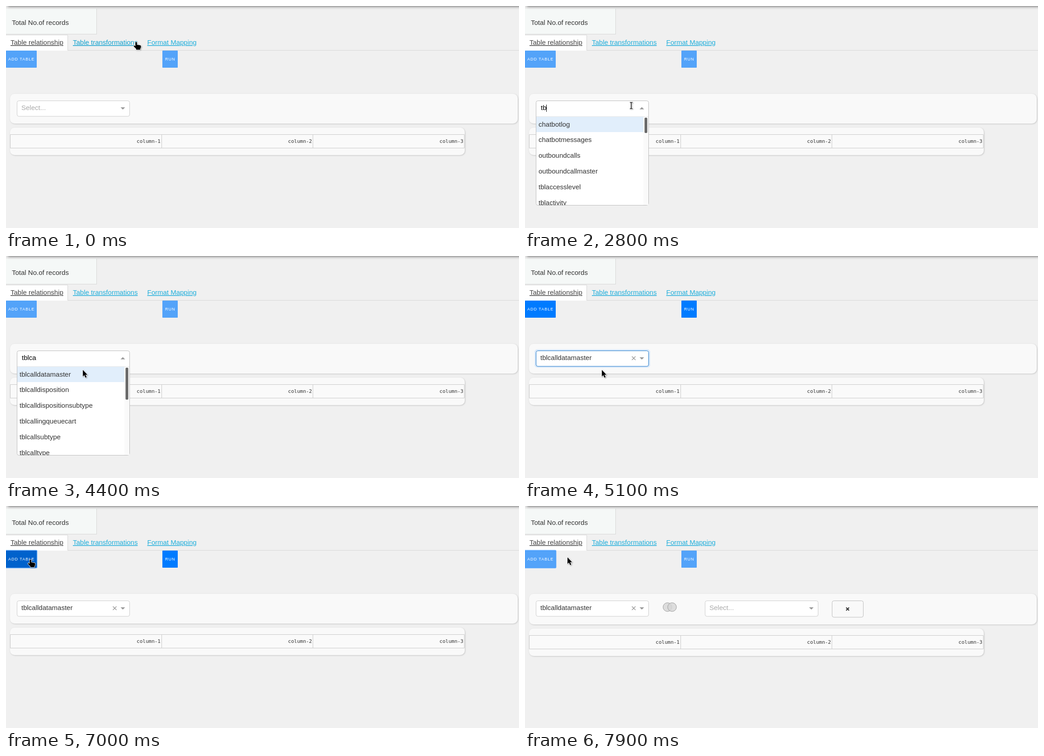
Recreate the animation shown at these times as an HTML page. Size 1135x493 px, loop 8000 ms.

```html
<!DOCTYPE html>
<html lang="en">
<head>
<meta charset="utf-8">
<title>Table relationship</title>
<style>
html, body { margin: 0; width: 100%; height: 100%; overflow: hidden; background: #f0f0f0; }
svg { display: block; font: 15px "Liberation Sans", Arial, sans-serif; fill: #333; }
.card { fill: #f9f9f9; filter: drop-shadow(1.5px 1.5px 1.5px #c4c4c4); }
.btn { font-size: 9px; letter-spacing: 1px; fill: #fff; }
.link { fill: #1eaedb; text-decoration: underline; }
.mono { font: 11px "DejaVu Sans Mono", monospace; text-anchor: end; }
.hint { fill: #aaa; }
.glyph { fill: #999; }
.box { fill: #fff; stroke: #ccc; }
.cursor { fill: #000; stroke: #fff; paint-order: stroke; stroke-width: 1.6; stroke-linejoin: round;
  filter: drop-shadow(1px 1px 1px #0005); }
</style>
</head>
<body>
<svg width="1135" height="493" viewBox="0 0 1135 493">
  <defs>
    <filter id="soft" x="-5%" y="-200%" width="110%" height="500%"><feGaussianBlur stdDeviation="3"/></filter>
    <clipPath id="menu"><path d="M25 246h248v196H25z"/></clipPath>
  </defs>
  <path fill="#f5f8f7" d="M0 6h200v57H0z"/>
  <path fill="none" stroke="#d6d6d6" d="M0 6.5M200.5 6v57M0 62.5h201"/>
  <path opacity=".75" filter="url(#soft)" d="M4-12H1150V1H4z"/>
  <text x="13" y="42">Total No.of records</text>
  <path fill="#fff" d="M0 65h136v34H0z"/>
  <path fill="none" stroke="#d6d6d6" d="M0 64.5h136.5v34H1135"/>
  <text x="10" y="86" text-decoration="underline" fill="#444">Table relationship</text>
  <text id="tab" class="link" x="148" y="86">Table transformations</text>
  <text class="link" x="312.5" y="86">Format Mapping</text>
  <g id="view"></g>
</svg>
<script>
const LOOP = 8000, STEP = 100;
const view = document.getElementById('view'), tab = document.getElementById('tab');

const shapes = {
  arrow: 'M0 0v14.5l3.3-3 2.5 5.7 2.5-1.1-2.5-5.4h4.4z',
  hand: 'M-1.7 1.5a1.7 1.7 0 0 1 3.4 0V6l6.8 1q2 .4 2 2.5V12l-1.5 3v2H0v-2l-5-5q-1.2-2 1-2.5l2.3 1.7z',
  beam: 'M-3-7.5h2.4l.6.6.6-.6H3v1.3H.7V6.2H3v1.3H.6L0 6.9l-.6.6H-3V6.2h2.3V-6.2H-3z'
};

// time, x, y, shape until the next entry
const path = [
  [0, 288, 80, 'hand'], [300, 288, 80, 'hand'], [400, 290, 90, 'arrow'], [800, 248, 221, 'arrow'],
  [900, 248, 221, 'arrow'], [1000, 244, 213, 'beam'], [1200, 235, 221, 'beam'], [4000, 235, 221, 'beam'],
  [4100, 248, 228, 'arrow'], [4400, 170, 253, 'arrow'], [5300, 170, 253, 'arrow'],
  [5800, 51, 120, 'hand'], [5900, 51, 120, 'hand'], [6000, 53, 119, 'hand'], [6600, 53, 119, 'hand'],
  [6700, 54, 119, 'hand'], [7400, 54, 119, 'hand'], [7600, 72, 117, 'arrow'], [7800, 94, 114, 'arrow'],
  [LOOP, 94, 114, 'arrow']
];

const typing = [[1600, ''], [2600, 't'], [2700, 'tb'], [3000, 'tbl'], [3400, 'tblc'], [3600, 'tblca']];
const caretX = [35.5, 39.5, 47.5, 51.5, 59, 67.5];

const lists = [
  [3400, 'tblcalldatamaster tblcalldisposition tblcalldispositionsubtype tblcallingqueuecart tblcallsubtype tblcalltype'],
  [3000, 'tblaccesslevel tblactivity tblagentgroup tblagentstatus tblbatchmaster tblbranch'],
  [2700, 'chatbotlog chatbotmessages outboundcalls outboundcallmaster tblaccesslevel tblactivity'],
  [1600, 'aspnetroles aspnetuserclaims aspnetuserlogins aspnetuserroles aspnetusers auth_group']
];

const rect = (x, y, w, h, attrs) => `<rect x="${x}" y="${y}" width="${w}" height="${h}" ${attrs}/>`;
const text = (x, y, s, attrs = '') => `<text x="${x}" y="${y}" ${attrs}>${s}</text>`;
const triangle = (x, up) => `<path class="glyph" d="M${x - 5} ${up ? '229.5h10l-5-5' : '225h10l-5 5'}z"/>`;

function cursor(t) {
  const i = path.findLastIndex(p => p[0] <= t);
  const [t0, x0, y0, shape] = path[i], [t1, x1, y1] = path[i + 1];
  const k = (t - t0) / (t1 - t0);
  const x = x0 + (x1 - x0) * k, y = y0 + (y1 - y0) * k;
  return `<path class="cursor" transform="translate(${x} ${y})" d="${shapes[shape]}"/>`;
}

function button(x, w, label, color, off) {
  return `<g opacity="${off ? .65 : 1}">${rect(x, 99, w, 38, `rx="1" fill="${color}"`)}</g>`
    + text(x + (x ? 6 : 5), 120.5, label, 'class="btn"');
}

function buttons(t) {
  const off = t < 5100 || t >= 7300;
  const pressed = t >= 6900 && t < 7300, over = t >= 5800 && t < 7700;
  const color = pressed ? '#0062cc' : over ? '#0069d9' : '#007bff';
  const ring = t >= 6900 ? rect(-1, 98.5, 69.5, 39, 'rx="2" fill="none" stroke="#007bff" stroke-opacity=".5" stroke-width="2"') : '';
  return ring + button(0, 68, 'ADD TABLE', color, off) + button(346, 34, 'RUN', '#007bff', off);
}

function table(y) {
  const labels = [1, 2, 3].map(n => text(7 + 335 * n, y + 34, 'column-' + n, 'class="mono"')).join('');
  return rect(9, y, 1006, 61, 'rx="10" class="card"')
    + `<path fill="#fafafa" stroke="#c8c8c8" d="M9.5 ${y + 15.5}h1004.5v30H9.5zM344.5 ${y + 15.5}v30M679 ${y + 15.5}v30"/>` + labels;
}

function select(t) {
  const focus = t >= 5000 && t < 6900;
  const ring = focus ? rect(22.5, 208.5, 253, 38, 'rx="5" fill="none" stroke="#007eff" stroke-opacity=".13" stroke-width="3"') : '';
  const box = rect(24.5, 210.5, 249, 34.5, `rx="4" class="box" ${focus ? 'style="stroke:#1a73c7"' : ''}`);
  const content = t < 5000 ? text(34, 231, 'Select...', 'class="hint"')
    : text(34, 231, 'tblcalldatamaster') + '<path fill="none" stroke="#999" stroke-width="1.5" d="M236.5 223l8 8m0-8l-8 8"/>';
  return ring + box + content + triangle(258.5);
}

function menu(t) {
  const typed = typing.findLast(e => e[0] <= t)[1];
  const names = lists.find(e => e[0] <= t)[1].split(' ');
  const thumb = t < 3400 ? 34 : t < 3600 ? 56 : 71;
  const rows = names.map((s, i) => text(30, 267.5 + 34.8 * i, s)).join('');
  const caret = t < 3900 ? rect(caretX[typed.length] - .5, 219, 1, 16, 'fill="#000"') : '';
  return rect(24.5, 210.5, 249, 232, 'rx="4" class="box" style="stroke:#bbb"')
    + (typed ? text(35, 231, typed, 'fill="#000"') : text(34, 231, 'Select...', 'class="hint"'))
    + caret + triangle(258.5, true)
    + rect(25, 245, 237, 35, 'fill="#e1eefb"') + rect(262, 245, 11, 197, 'fill="#fafafa"')
    + '<path stroke="#e6e6e6" d="M25 245.5h248"/>'
    + `<g clip-path="url(#menu)">${rows}</g>`
    + rect(264.5, 248, 6, thumb, 'rx="2" fill="#686868"');
}

function joinRow() {
  const ring = x => `<circle cx="${x}" cy="224.5" r="9.7" fill="#d6d6d6" fill-opacity=".8" stroke="#999"/>`;
  return ring(315.2) + ring(325.4)
    + rect(398.5, 210.5, 250, 34.5, 'rx="4" class="box"') + text(408, 231, 'Select...', 'class="hint"') + triangle(633.5)
    + rect(679.5, 210.5, 69, 36.5, 'rx="4" fill="none" stroke="#bbb"')
    + '<path stroke="#333" stroke-width="2.2" d="M710.5 225.5l6.5 6.5m0-6.5l-6.5 6.5"/>';
}

function draw(t) {
  const joined = t >= 7300, open = t >= 1600 && t < 5000;
  tab.style.fill = t < 400 ? '#0fa0ce' : '';
  view.innerHTML = buttons(t)
    + rect(9, 195, 1123, joined ? 68 : 66, 'rx="10" class="card"')
    + table(joined ? 272 : 270)
    + (open ? menu(t) : select(t))
    + (joined ? joinRow() : '')
    + cursor(t);
}

let last = -1;
const start = performance.now();
function tick() {
  const t = Math.floor((performance.now() - start) % LOOP / STEP) * STEP;
  if (t !== last) draw(last = t);
  requestAnimationFrame(tick);
}
tick();
</script>
</body>
</html>
```
